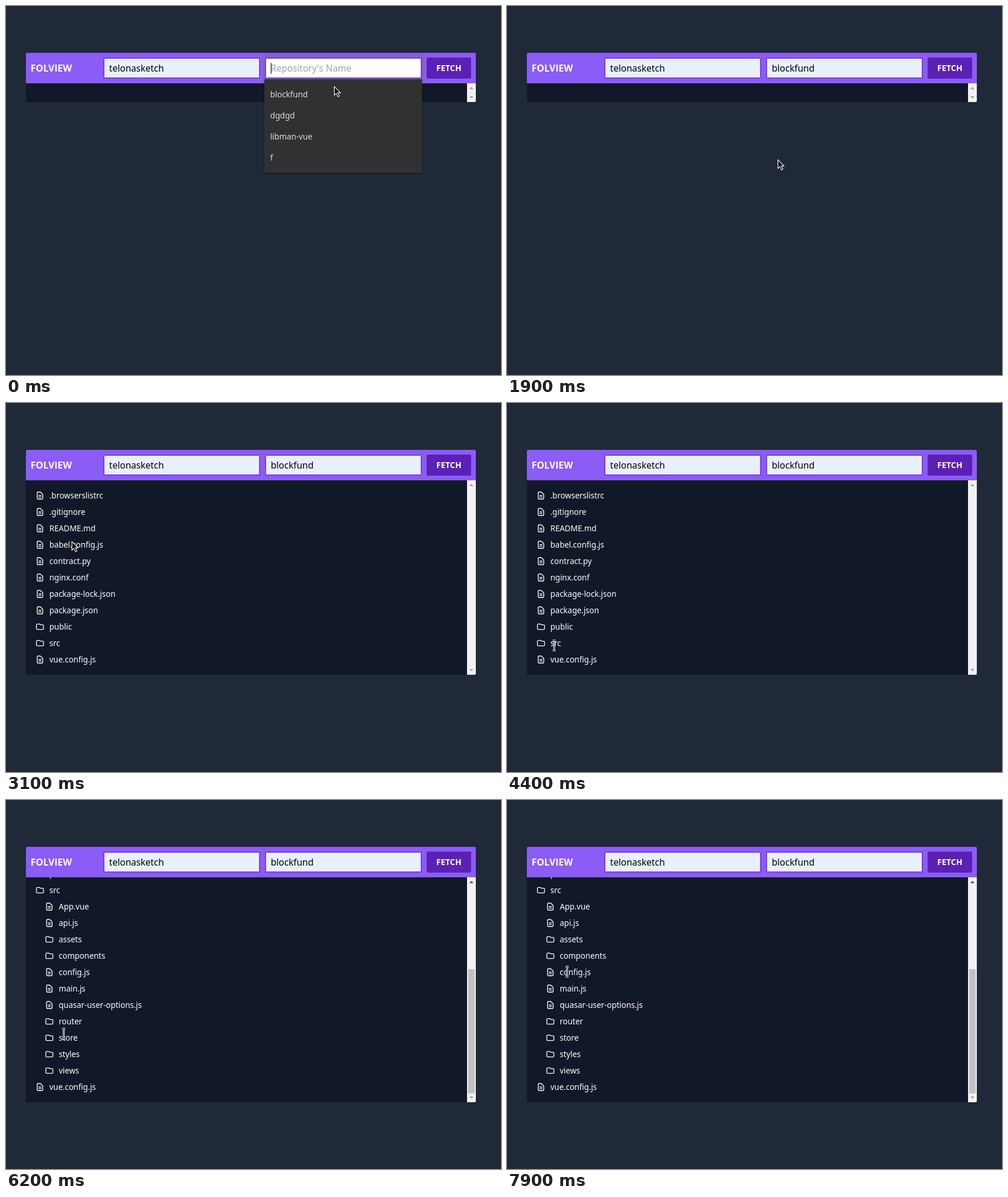
These frames come from a looping animation (845 px wide and 630 px high, 8 s). An HTML page:

```html
<!DOCTYPE html>
<html lang="en">
<head>
<meta charset="utf-8">
<title>Folder viewer</title>
<style>
  html, body { margin: 0; width: 100%; height: 100%; overflow: hidden; background: #202937; }
  body { position: relative; font: 15.6px/20px "Noto Sans", sans-serif; }
  div, svg { position: absolute; box-sizing: border-box; white-space: pre; }
  .bar { left: 34px; top: 80px; width: 768px; height: 52px; background: #8b5cf6; border-radius: 2px 2px 0 0; }
  .title { left: 8px; top: 16px; color: #fff; font: 700 16px/20px "Open Sans", sans-serif; }
  .field { top: 8px; width: 268px; height: 36px; padding: 6px 8px; border: 2px solid #7c3aed; border-radius: 2px; background: #e8f0fe; color: #000; }
  #user { left: 132px; }
  #repo { left: 408px; }
  #repo.focus { box-shadow: 0 0 0 4px rgba(107, 114, 128, .5); }
  #repo.empty { background: #fff; color: #9ca3af; }
  #caret { left: 418px; top: 17px; width: 1px; height: 19px; background: #000; }
  .button { left: 684px; top: 8px; width: 76px; height: 36px; border-radius: 2px; background: #5b21b6; color: #fff; text-align: center; font: 700 14px/36px "Open Sans", sans-serif; }
  #menu { left: 441px; top: 125px; width: 269px; height: 160px; padding: 8px 0; background: #313131; border-radius: 0 0 2px 2px; box-shadow: 0 1px 3px rgba(0, 0, 0, .45); }
  #menu div { position: static; height: 36px; padding-left: 10px; color: #dedede; font-weight: 500; font-size: 13.7px; line-height: 36px; }
  #menu .on { background: #484848; }
  #panel { left: 34px; top: 132px; width: 768px; overflow: hidden; background: #111827; border-radius: 0 0 2px 2px; }
  #list { left: 0; top: 0; width: 753px; }
  .row { height: 20px; color: #fff; font-size: 13.6px; letter-spacing: -.05px; }
  .row svg { left: 0; top: 2px; width: 16px; height: 16px; fill: none; stroke: #fff; stroke-width: 2; stroke-linecap: round; stroke-linejoin: round; }
  .row span { margin-left: 24px; }
  .track { right: 0; top: 0; width: 15px; height: 100%; background: #f1f1f1; }
  #thumb { left: 2px; width: 11px; background: #c1c1c1; }
  .arrow { left: 4px; width: 7px; height: 4px; background: currentColor; }
  #up { top: 6px; clip-path: polygon(50% 0, 100% 100%, 0 100%); }
  #down { bottom: 6px; clip-path: polygon(0 0, 100% 0, 50% 100%); }
  .pointer { left: 0; top: 0; overflow: visible; width: 1px; height: 1px; }
</style>
</head>
<body>
<div class="bar">
  <div class="title">FOLVIEW</div>
  <div class="field" id="user">telonasketch</div>
  <div class="field" id="repo"></div>
  <div id="caret"></div>
  <div class="button">FETCH</div>
</div>
<div id="panel">
  <div id="list"></div>
  <div class="track">
    <div class="arrow" id="up"></div>
    <div id="thumb"></div>
    <div class="arrow" id="down"></div>
  </div>
</div>
<div id="menu"></div>
<svg class="pointer" id="hand"><path d="M.5 .5V15.2L3.9 12.1 6.5 17.9 9 16.8 6.5 11.1H10.9Z" fill="#0b0d12" stroke="#fff" stroke-width="1.1"/></svg>
<svg class="pointer" id="beam" fill="none">
  <path id="stem" d="M-2-8.5H3M.5-8.5V8.5M-2 8.5H3" stroke="#fff" stroke-width="3"/>
  <path d="M-2-8.5H3M.5-8.5V8.5M-2 8.5H3" stroke="#111"/>
</svg>
<script>
const LOOP = 8000, TICK = 100;
const MAX_HEIGHT = 384, BUTTON = 15, PAD = 16, PITCH = 28;
const PICK = 900, FETCH = 1300, LOADED = 2200, OVER_TEXT = 3300, EXPAND = 5200;
const $ = id => document.getElementById(id);

const suggestions = ['blockfund', 'dgdgd', 'libman-vue', 'f'];
const root = ['.browserslistrc', '.gitignore', 'README.md', 'babel.config.js', 'contract.py', 'nginx.conf',
  'package-lock.json', 'package.json', 'public', 'src', 'vue.config.js'];
const nested = ['App.vue', 'api.js', 'assets', 'components', 'config.js', 'main.js', 'quasar-user-options.js',
  'router', 'store', 'styles', 'views'];
const split = root.indexOf('src') + 1;
const icons = {
  file: 'M9 12h6m-6 4h6m2 5H7a2 2 0 01-2-2V5a2 2 0 012-2h5.586a1 1 0 01.707.293l5.414 5.414a1 1 0 01.293.707V19a2 2 0 01-2 2z',
  folder: 'M3 7v10a2 2 0 002 2h14a2 2 0 002-2V9a2 2 0 00-2-2h-6l-2-2H5a2 2 0 00-2 2z'
};

// Eased progress from 0 to 1 between two times.
function glide(t, from, to) {
  const k = Math.min(1, Math.max(0, (t - from) / (to - from)));
  return k * k * (3 - 2 * k);
}

// Each move starts where the previous one ended; bend bows it vertically.
function pointerAt(t) {
  let x = 560, y = 137;
  const move = (from, to, toX, toY, bend = 0) => {
    const k = glide(t, from, to);
    x += (toX - x) * k;
    y += (toY - y) * k + bend * Math.sin(Math.PI * k);
  };
  move(0, 200, 538, 238);
  move(500, 800, 512, 150);
  move(PICK, FETCH, 752, 104);
  move(1400, 2300, 254, 264, 67);
  move(2300, 2900, 113, 228, -75);
  move(3000, 3900, 74, 460);
  move(3900, 4400, 80, 414);
  move(EXPAND, 6200, 98, 399);
  move(6200, 7100, 108, 391);
  move(7300, 7900, 102, 293);
  return [x, y];
}

// Share of the full scroll distance: down, back up, down again.
const scrollAt = t => glide(t, 5500, 5900) - glide(t, 6200, 7000) + glide(t, 7100, 7580);

function makeRow(name, indent) {
  const row = document.createElement('div');
  const icon = name.includes('.') ? icons.file : icons.folder;
  row.className = 'row';
  row.style.left = PAD + indent + 'px';
  row.innerHTML = `<svg viewBox="0 0 24 24"><path d="${icon}"/></svg><span>${name}</span>`;
  $('list').append(row);
  return row;
}

const rootRows = root.map(name => makeRow(name, 0));
const nestedRows = nested.map(name => makeRow(name, 16));
const expandedRows = [...rootRows.slice(0, split), ...nestedRows, ...rootRows.slice(split)];
const options = suggestions.map(name => {
  const option = document.createElement('div');
  option.textContent = name;
  $('menu').append(option);
  return option;
});

const show = (el, on) => { el.style.display = on ? '' : 'none'; };

function drawField(t, y) {
  const open = t < PICK;
  const hover = open && t > 0 ? Math.floor((y - 133) / 36) : -1;
  const text = open ? suggestions[hover] : suggestions[0];
  show($('menu'), open);
  options.forEach((option, i) => option.classList.toggle('on', i === hover));
  $('repo').textContent = text || "Repository's Name";
  $('repo').classList.toggle('empty', !text);
  $('repo').classList.toggle('focus', t < FETCH);
  show($('caret'), !text);
}

function drawPanel(t) {
  const rows = t < LOADED ? [] : t < EXPAND ? rootRows : expandedRows;
  const content = 2 * PAD + Math.max(0, rows.length * PITCH - 8);
  const height = Math.min(content, MAX_HEIGHT);
  const hidden = content - height;
  const scroll = Math.round(hidden * scrollAt(t));
  const trackLength = height - 2 * BUTTON;

  expandedRows.forEach(row => show(row, rows.includes(row)));
  rows.forEach((row, i) => { row.style.top = PAD + i * PITCH + 'px'; });
  $('panel').style.height = height + 'px';
  $('list').style.top = -scroll + 'px';

  show($('thumb'), hidden > 0);
  $('thumb').style.top = Math.round(BUTTON + scroll / content * trackLength) + 'px';
  $('thumb').style.height = Math.round(height / content * trackLength) + 'px';
  const tint = on => on ? '#505050' : '#a3a3a3';
  $('up').style.color = tint(scroll > 0);
  $('down').style.color = tint(scroll < hidden);
}

function drawPointer(t, x, y) {
  const beam = t >= OVER_TEXT;
  show($('hand'), !beam);
  show($('beam'), beam);
  $(beam ? 'beam' : 'hand').style.transform = `translate(${Math.round(x)}px, ${Math.round(y)}px)`;
}

let start;
function frame(now) {
  start ??= now;
  const t = Math.floor((now - start) % LOOP / TICK) * TICK;
  const [x, y] = pointerAt(t);
  drawField(t, y);
  drawPanel(t);
  drawPointer(t, x, y);
  requestAnimationFrame(frame);
}
requestAnimationFrame(frame);
</script>
</body>
</html>
```
